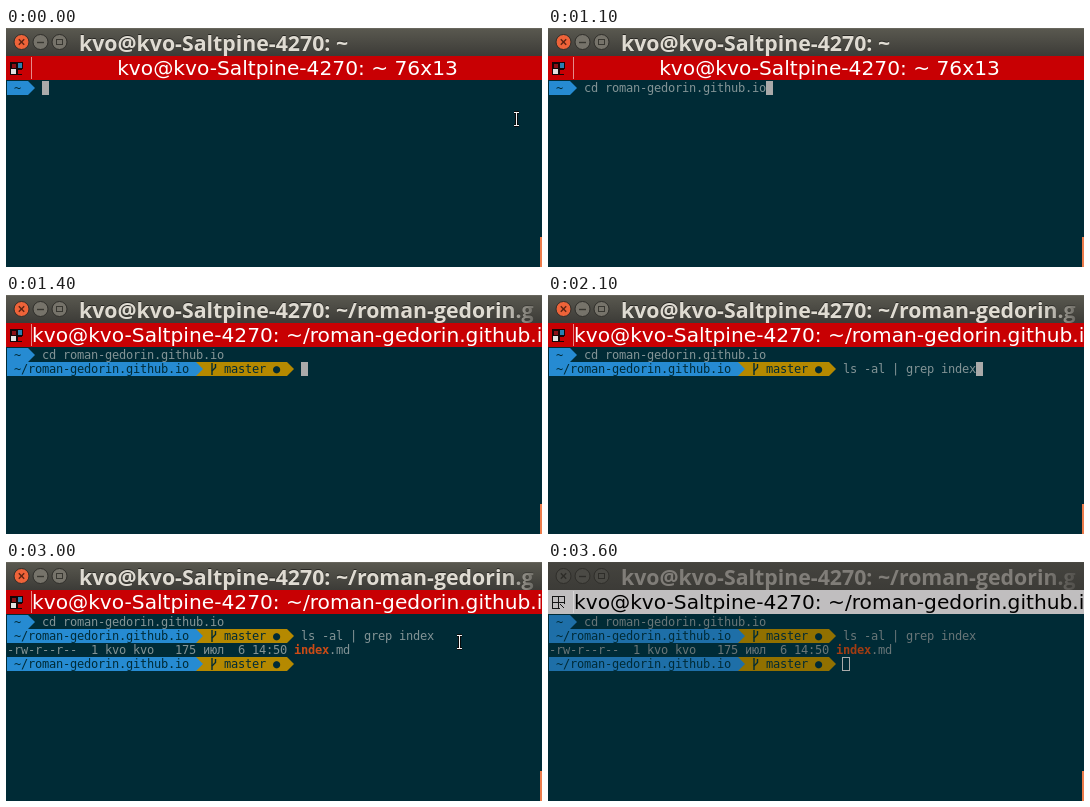
Animation, 536 px wide and 239 px high, one loop 3.7 s. Source, as an HTML page with a canvas:

```html
<!DOCTYPE html>
<html lang="en">
<head>
<meta charset="utf-8">
<title>Terminal</title>
<style>
html, body { margin: 0; width: 100%; height: 100%; overflow: hidden; background: #002b36; }
canvas { display: block; }
</style>
</head>
<body>
<canvas id="stage" width="536" height="239"></canvas>
<script>
const ctx = document.getElementById('stage').getContext('2d');
const LOOP = 3700, COL = 7, ROW = 14, LEFT = 1, TOP = 53, BAR = 28;
const USER = 'kvo', HOST = USER + '@' + USER + '-Saltpine-4270: ';
const REPO = 'roman-gedorin.github.io';
const CD = 'cd ' + REPO, LS = 'ls -al | grep index';
const MONO = '12px "DejaVu Sans Mono", monospace';
const BG = '#002b36';
const LIVE = { text: '#839496', hint: '#586e75', blue: '#268bd2', gold: '#b58900', hit: '#cb4b16' };
const DIM = { text: '#697678', hint: '#46585e', blue: '#1e6fa8', gold: '#917000', hit: '#a23c12' };
let pal = LIVE;

const colX = c => LEFT + c * COL;
const rowY = r => TOP + r * ROW;

function rect(x, y, w, h, fill) {
  ctx.fillStyle = fill;
  ctx.fillRect(x, y, w, h);
}

function line(color, width, ...pts) {
  ctx.strokeStyle = color;
  ctx.lineWidth = width;
  ctx.beginPath();
  for (let i = 0; i < pts.length; i += 2) ctx.lineTo(pts[i], pts[i + 1]);
  ctx.stroke();
}

// One glyph per terminal cell.
function type(str, col, row, color, bold) {
  ctx.font = (bold ? 'bold ' : '') + MONO;
  ctx.textAlign = 'left';
  ctx.fillStyle = color;
  [...str].forEach((ch, i) => ctx.fillText(ch, colX(col + i), rowY(row) + 11));
}

function arrow(col, row, color) {
  const x = colX(col), y = rowY(row);
  ctx.fillStyle = color;
  ctx.beginPath();
  ctx.moveTo(x, y);
  ctx.lineTo(x + COL, y + ROW / 2);
  ctx.lineTo(x, y + ROW);
  ctx.fill();
}

function cells(col, count, row, color) {
  rect(colX(col), rowY(row), count * COL, ROW, color);
}

function homePrompt() {
  cells(0, 3, 0, pal.blue);
  arrow(3, 0, pal.blue);
  type('~', 1, 0, BG);
}

function repoPrompt(row) {
  cells(0, 27, row, pal.blue);
  cells(27, 13, row, pal.gold);
  arrow(27, row, pal.blue);
  arrow(40, row, pal.gold);
  type('~/' + REPO, 1, row, BG);
  type('master ●', 31, row, BG);
  const x = colX(29), y = rowY(row);
  line(BG, 1.4, x + 2, y + 1, x + 2, y + 13);
  line(BG, 1.4, x + 5.5, y + 2, x + 5.5, y + 5.5, x + 2, y + 9);
}

function caret(col, row, hollow) {
  if (hollow) {
    ctx.strokeStyle = '#aaaaaa';
    ctx.lineWidth = 1;
    ctx.strokeRect(colX(col) - .5, rowY(row) + .5, COL, ROW - 1);
  } else cells(col, 1, row, '#aaaaaa');
}

// Typed part in normal colour, suggested rest in a fainter one.
function command(str, typed, col, row, hint) {
  type(str.slice(0, typed), col, row, pal.text);
  if (hint) type(str.slice(typed), col + typed, row, pal.hint);
}

function button(x, kind, focus) {
  const close = kind === 'close', y = 14;
  ctx.beginPath();
  ctx.arc(x, y, 7.5, 0, 7);
  ctx.fillStyle = !focus ? '#4b4a45' : close ? '#ee6339' : '#76736a';
  ctx.fill();
  ctx.strokeStyle = '#2f2e2a';
  ctx.lineWidth = 1;
  ctx.stroke();
  const ink = focus ? (close ? '#5c2413' : '#383731') : '#2e2d29';
  if (close) {
    line(ink, 1.4, x - 2.7, y - 2.7, x + 2.7, y + 2.7);
    line(ink, 1.4, x + 2.7, y - 2.7, x - 2.7, y + 2.7);
  } else if (kind === 'min') line(ink, 1.4, x - 3.5, y + .5, x + 3.5, y + .5);
  else {
    ctx.strokeStyle = ink;
    ctx.strokeRect(x - 3, y - 2.5, 6, 5);
  }
}

function titleBar(path, focus) {
  const bar = ctx.createLinearGradient(0, 0, 0, BAR);
  bar.addColorStop(0, focus ? '#5a5950' : '#45443f');
  bar.addColorStop(1, '#3c3b37');
  rect(0, 0, 536, BAR, bar);
  rect(0, 0, 536, 1, focus ? '#68665d' : '#4a4944');
  button(15.5, 'close', focus);
  button(34.5, 'min', focus);
  button(53.5, 'max', focus);

  ctx.save();
  ctx.beginPath();
  ctx.rect(70, 0, 459, BAR);
  ctx.clip();
  ctx.font = 'bold 21.3px "Open Sans", "Noto Sans", sans-serif';
  ctx.textAlign = 'left';
  const fade = rgb => {
    const g = ctx.createLinearGradient(496, 0, 536, 0);
    g.addColorStop(0, `rgba(${rgb},1)`);
    g.addColorStop(1, `rgba(${rgb},0.1)`);
    return g;
  };
  if (focus) {
    ctx.fillStyle = fade('40,39,35');
    ctx.fillText(HOST + path, 73, 22);
  }
  ctx.fillStyle = fade(focus ? '223,219,210' : '128,125,120');
  ctx.fillText(HOST + path, 73, 23);
  ctx.restore();
}

function groupIcon(focus) {
  if (focus) {
    rect(4, 34, 13, 13, '#150608');
    rect(6, 36, 4, 4, '#8c1016');
    rect(12, 35, 4, 5, '#2b7fb0');
    rect(5, 41, 5, 5, '#e2e2e2');
    rect(12, 42, 4, 4, '#c80003');
    rect(16, 41, 1, 6, '#c80003');
  } else {
    ctx.strokeStyle = '#151515';
    ctx.lineWidth = 1;
    ctx.strokeRect(4.5, 34.5, 12, 12);
    line('#151515', 1, 10.5, 34, 10.5, 47);
    line('#151515', 1, 4, 40.5, 17, 40.5);
    rect(12, 42, 6, 6, '#c0bebf');
    line('#151515', 1, 12, 42, 16, 46);
  }
}

function paneBar(inRepo, focus) {
  rect(0, BAR, 536, 52 - BAR, focus ? '#c80003' : '#c0bebf');
  groupIcon(focus);
  rect(25, 29, 1, 22, focus ? '#e58a8b' : '#d8d6d7');
  ctx.save();
  ctx.beginPath();
  ctx.rect(26, BAR, 510, 52 - BAR);
  ctx.clip();
  ctx.font = '20.2px "DejaVu Sans", sans-serif';
  ctx.fillStyle = focus ? '#fff' : '#000';
  ctx.textAlign = inRepo ? 'left' : 'center';
  ctx.fillText(HOST + (inRepo ? '~/' + REPO : '~ 76x13'), inRepo ? 26 : 281.5, 47);
  ctx.restore();
}

function beam(x, y) {
  for (const [color, w] of [['#0a0a0a', 3], ['#f4f4f4', 1]]) {
    line(color, w, x + .5, y - 6, x + .5, y + 6);
    line(color, w, x - 2, y - 6.5, x + 3, y - 6.5);
    line(color, w, x - 2, y + 6.5, x + 3, y + 6.5);
  }
}

function pointer(x, y) {
  ctx.beginPath();
  for (const [dx, dy] of [[0, 0], [0, 15], [4, 12], [6, 17], [8, 16], [6, 11], [10, 11]]) ctx.lineTo(x + dx, y + dy);
  ctx.closePath();
  ctx.fillStyle = '#111';
  ctx.fill();
  ctx.strokeStyle = '#fff';
  ctx.lineWidth = 1;
  ctx.stroke();
}

function mouse(t) {
  if (t < 200) return beam(510, 91);
  if (t < 3000 || t >= 3400) return;
  const k = Math.floor((t - 3000) / 100) / 3;
  const x = 453 - 244 * k, y = 80 - 74 * k;
  (y > 52 ? beam : pointer)(x, y);
}

function shell(t, focus) {
  homePrompt();
  const typed = t < 300 ? 0 : t < 500 ? 1 : t < 700 ? 2 : t < 900 ? 3 : t < 1100 ? 4 : CD.length;
  if (t < 1300) caret(5 + typed, 0);
  command(CD, typed, 5, 0, t >= 900);
  if (t < 1300) return;
  if (t < 1400) return caret(0, 1);

  repoPrompt(1);
  const keyed = t < 1700 ? 0 : t < 2100 ? 1 : LS.length;
  if (t < 2400) caret(42 + keyed, 1);
  command(LS, keyed, 42, 1, t >= 1700);
  if (t < 2400) return;

  type(`-rw-r--r--  1 ${USER} ${USER}   175 июл  6 14:50`, 0, 2, pal.text);
  type('index', 41, 2, pal.hit, true);
  type('.md', 46, 2, pal.text);
  repoPrompt(3);
  if (t < 3000 || !focus) caret(42, 3, !focus);
}

function draw() {
  const t = performance.now() % LOOP;
  const focus = t < 3600, inRepo = t >= 1400;
  pal = focus ? LIVE : DIM;
  rect(0, 0, 536, 239, BG);
  titleBar(inRepo ? '~/' + REPO : '~', focus);
  paneBar(inRepo, focus);
  shell(t, focus);
  rect(534, 209, 2, 30, '#ec7c4b');
  mouse(t);
  requestAnimationFrame(draw);
}
draw();
</script>
</body>
</html>
```
